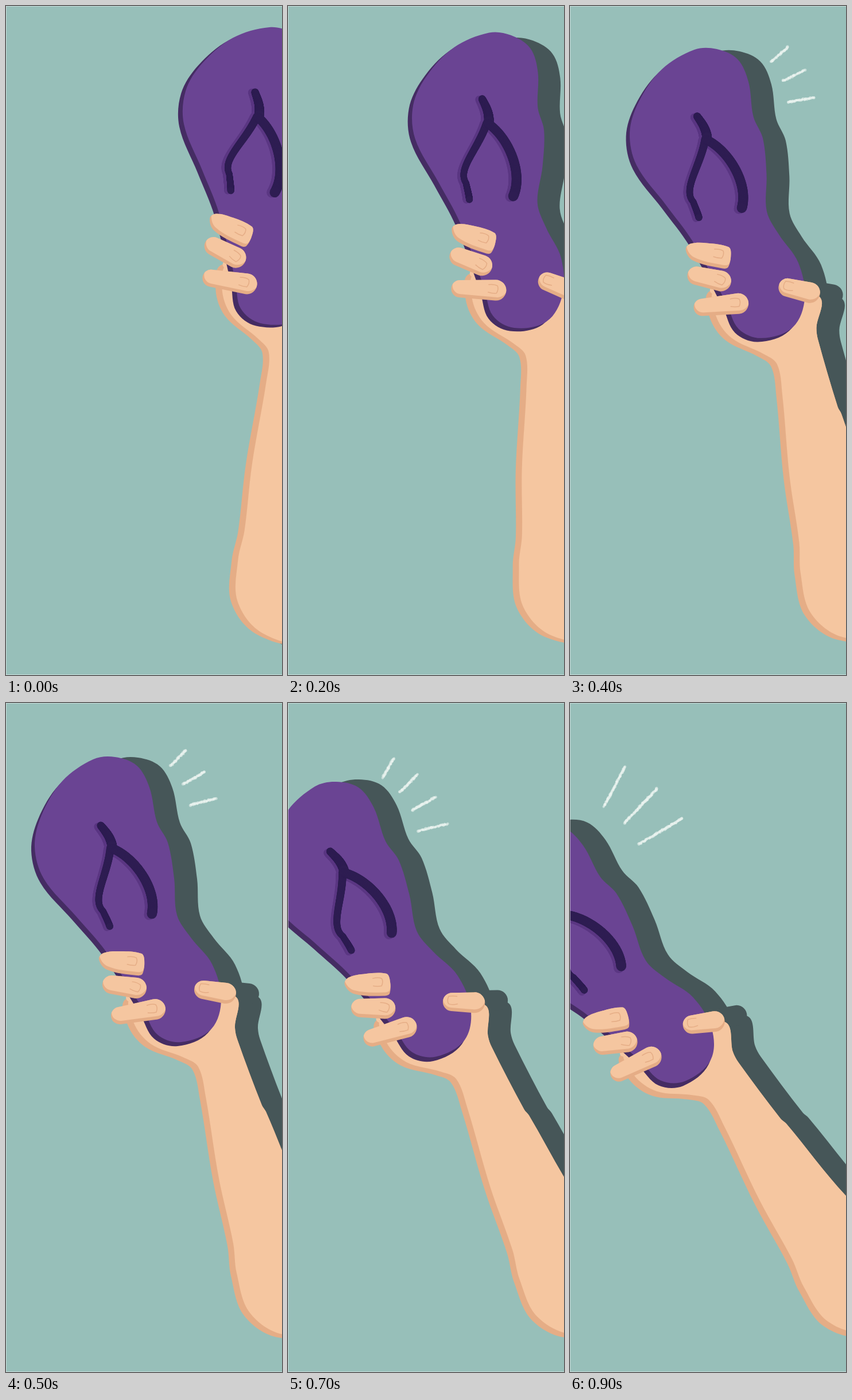
Animation, 481 px wide and 1164 px high, one loop 1 s. Source, as an HTML page with a canvas:

```html
<!DOCTYPE html>
<html lang="en">
<head>
<meta charset="utf-8">
<title>Slipper swing</title>
<style>
html, body { margin: 0; width: 481px; height: 1164px; overflow: hidden; background: #97bfb9; }
canvas { display: block; }
</style>
</head>
<body>
<canvas id="stage" width="481" height="1164"></canvas>
<script>
const ctx = document.getElementById('stage').getContext('2d');
const W = 481, H = 1164, STEP = 100, STEPS = 10;
const ELBOW = { x: 488, y: 985 }, TOE = { x: 190, y: 210 };
const COLOR = {
  wall: '#97bfb9', shadow: '#465658', skin: '#f5c6a0', skinDark: '#e5ad86',
  sole: '#6a4493', soleDark: '#452c63', strap: '#2e1d52', strapDark: '#5b3783',
  chalk: 'rgba(238,245,243,0.55)', edge: 'rgba(255,255,255,0.45)'
};
const rad = deg => deg * Math.PI / 180;
const lerp = (a, b, u) => a + (b - a) * u;

// Closed smooth curve through key points, handles scaled to each segment
function smooth(pts) {
  const path = new Path2D(), n = pts.length;
  const at = i => pts[(i + n) % n];
  const heading = i => {
    const [ax, ay] = at(i - 1), [bx, by] = at(i + 1);
    return Math.atan2(by - ay, bx - ax);
  };
  path.moveTo(...pts[0]);
  for (let i = 0; i < n; i++) {
    const [ax, ay] = at(i), [bx, by] = at(i + 1);
    const k = Math.hypot(bx - ax, by - ay) / 3, p = heading(i), q = heading(i + 1);
    path.bezierCurveTo(ax + k * Math.cos(p), ay + k * Math.sin(p),
      bx - k * Math.cos(q), by - k * Math.sin(q), bx, by);
  }
  path.closePath();
  return path;
}

// Two round ends joined by their common tangents
function capsule(x1, y1, r1, x2, y2, r2) {
  const path = new Path2D();
  const axis = Math.atan2(y2 - y1, x2 - x1);
  const spread = Math.acos((r1 - r2) / Math.hypot(x2 - x1, y2 - y1));
  path.arc(x1, y1, r1, axis + spread, axis - spread + 2 * Math.PI);
  path.arc(x2, y2, r2, axis - spread, axis + spread);
  path.closePath();
  return path;
}

const sole = smooth([
  [152, 98], [190, 94], [228, 109], [250, 147], [263, 207], [282, 243], [293, 305],
  [298, 369], [322, 408], [359, 454], [375, 515], [358, 567], [305, 590], [264, 577],
  [240, 535], [174, 432], [122, 371], [66, 306], [50, 250], [62, 195], [98, 136]
]);
const arm = smooth([
  [209, 515], [212, 560], [242, 598], [300, 622], [325, 638], [338, 690], [361, 832],
  [386, 945], [392, 997], [415, 1066], [475, 1104], [560, 1090], [600, 1000], [517, 860],
  [453, 711], [446, 700], [403, 585], [399, 565], [399, 510], [300, 500]
]);
const palmTip = capsule(215, 513, 6, 222, 517, 6);
const indexFinger = smooth([
  [162, 446], [170, 435], [200, 432], [236, 436], [241, 446], [238, 471], [228, 474], [176, 464]
]);
const middleFinger = capsule(184, 490, 16, 227, 496, 18);
const ringFinger = capsule(198, 544, 15, 260, 533, 18);
const thumb = capsule(344, 499, 16, 383, 505, 18);
const nail = new Path2D('M-8 -7 Q2 -9 8 -6 Q11 0 7 7 Q0 8 -8 6');

function fill(path, color, dx = 0, dy = 0) {
  ctx.save();
  ctx.translate(dx, dy);
  ctx.fillStyle = color;
  ctx.fill(path);
  ctx.restore();
}

function fillShaded(path, dx, dy) {
  fill(path, COLOR.skinDark);
  ctx.save();
  ctx.clip(path);
  fill(path, COLOR.skin, dx, dy);
  ctx.restore();
}

function drawFinger(shape, nailX, nailY, nailAngle) {
  fillShaded(shape, 1, -6);
  ctx.save();
  ctx.translate(nailX, nailY);
  ctx.rotate(rad(nailAngle));
  ctx.strokeStyle = COLOR.skinDark;
  ctx.lineWidth = 1.5;
  ctx.stroke(nail);
  ctx.restore();
}

// Round brush along a cubic curve, its radius changing from r1 to r2
function brush([x1, y1], [cx, cy], [dx, dy], [x2, y2], r1, r2) {
  const cubic = (a, b, c, d, u) => {
    const v = 1 - u;
    return v * v * v * a + 3 * v * u * (v * b + u * c) + u * u * u * d;
  };
  for (let u = 0; u <= 1; u += 0.01) {
    ctx.beginPath();
    ctx.arc(cubic(x1, cx, dx, x2, u), cubic(y1, cy, dy, y2, u), lerp(r1, r2, u), 0, 7);
    ctx.fill();
  }
}

function drawStrap(color, dx, dy) {
  ctx.save();
  ctx.translate(dx, dy);
  ctx.fillStyle = color;
  brush([165, 213], [172, 222], [182, 232], [185, 249], 6.5, 8.5);
  brush([182, 252], [177, 300], [148, 342], [169, 362], 7, 5.5);
  brush([169, 362], [173, 371], [178, 380], [181, 389], 5.5, 6);
  brush([185, 253], [225, 269], [264, 325], [254, 368], 8, 8.8);
  ctx.restore();
}

function drawHand() {
  for (const part of [sole, arm, thumb]) fill(part, COLOR.shadow, 40, 1);
  fillShaded(arm, 10, -5);
  fill(palmTip, COLOR.skin);
  fill(sole, COLOR.soleDark, -6, 7);
  fill(sole, COLOR.sole);
  drawStrap(COLOR.strapDark, -5, 2);
  drawStrap(COLOR.strap, 0, 0);
  drawFinger(indexFinger, 219, 449, 3);
  drawFinger(middleFinger, 225, 494, 18);
  drawFinger(ringFinger, 254, 532, -8);
  drawFinger(thumb, 346, 496, 184);
}

function random(seed) {
  return () => (seed = seed * 16807 % 2147483647) / 2147483647;
}

// Chalk rays fan out from the toe and fly off in the last steps
function drawChalk(step) {
  if (step < 4) return;
  const rnd = random(911 * step);
  const burst = Math.max(0, step - 7);
  const rays = step === 7 ? 4 : 3;
  ctx.fillStyle = COLOR.chalk;
  for (let i = 0; i < rays; i++) {
    const angle = rad(-30 + 16 * (i - (rays - 1) / 2));
    const length = 38 + 20 * burst + 5 * i;
    const near = 159 + 22 * burst - length / 2;
    for (let s = 0; s < length; s += 1.3) {
      const jitter = () => (rnd() - 0.5) * 1.8;
      ctx.beginPath();
      ctx.arc(TOE.x + (near + s) * Math.cos(angle) + jitter(),
        TOE.y + (near + s) * Math.sin(angle) + jitter(), 1.9 + rnd() * 0.9, 0, 7);
      ctx.fill();
    }
  }
}

// Key poses: step and counter-clockwise angle in degrees
const POSES = [[0, -19], [2, -12.4], [5, 0], [7, 7], [8, 12.1], [9, 16.4]];

function swing(step) {
  const i = Math.max(1, POSES.findIndex(pose => pose[0] >= step));
  const [from, a] = POSES[i - 1], [to, b] = POSES[i];
  return lerp(a, b, (step - from) / (to - from));
}

function draw(time) {
  const step = Math.floor(time / STEP) % STEPS;
  ctx.fillStyle = COLOR.wall;
  ctx.fillRect(0, 0, W, H);
  ctx.save();
  ctx.translate(ELBOW.x, ELBOW.y);
  ctx.rotate(rad(-swing(step)));
  ctx.translate(-ELBOW.x, -ELBOW.y);
  drawHand();
  drawChalk(step);
  ctx.restore();
  ctx.strokeStyle = COLOR.edge;
  ctx.lineWidth = 1;
  ctx.strokeRect(0.5, 0.5, W, H - 1);
}

const start = performance.now();
function tick() {
  draw(performance.now() - start);
  requestAnimationFrame(tick);
}
tick();
</script>
</body>
</html>
```
